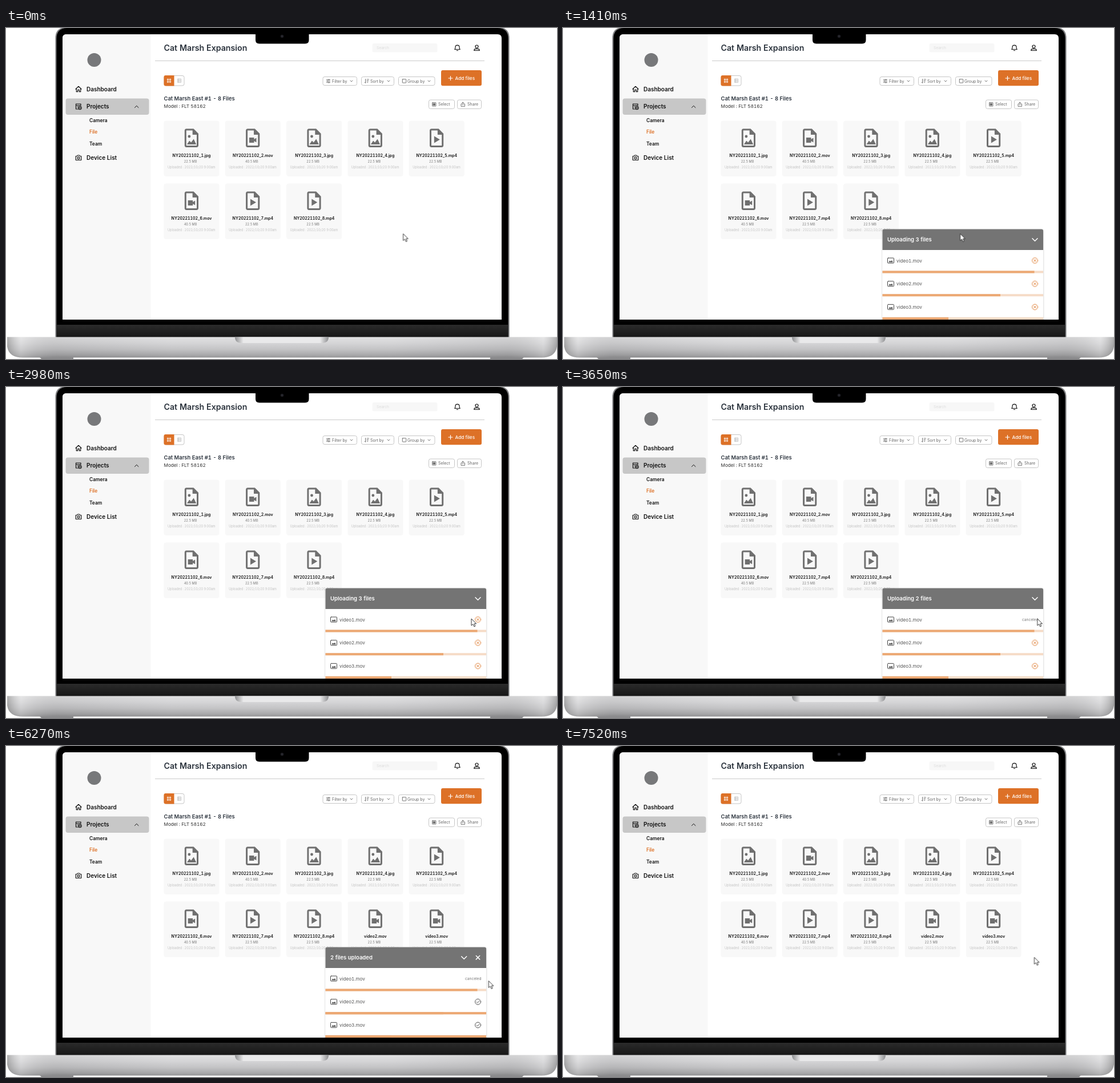
Write an HTML page that moves like this. It is 965 by 580 pixels and loops after 8 s.

```html
<!DOCTYPE html>
<html lang="en">
<head>
<meta charset="utf-8">
<title>File upload</title>
<style>
html, body { margin: 0; width: 100%; height: 100%; overflow: hidden; background: #fff; }
svg { display: block; }
text { font-family: Inter, "Open Sans", sans-serif; font-variant-numeric: tabular-nums; fill: #111; }
.mid { text-anchor: middle; }
.line { fill: none; stroke: #111; stroke-width: 1.2; stroke-linecap: round; stroke-linejoin: round; }
.nav { font-size: 10px; font-weight: 600; }
.sub { font-size: 8.4px; font-weight: 600; }
.btn { font-size: 7px; fill: #666; }
.box { fill: #fff; stroke: #c6c6c6; }
.grey { stroke: #666; stroke-width: .9; }
.name { font-size: 7px; font-weight: 600; }
.size { font-size: 5.6px; fill: #777; }
.date { font-size: 5.5px; fill: #c2c2c2; }
.head { font-size: 9.5px; font-weight: 600; fill: #fff; }
.white { stroke: #fff; stroke-width: 1.5; }
.orange { stroke: #e0853f; stroke-width: 1; }
.row { font-size: 8.1px; fill: #555; }
.dark { stroke: #444; stroke-width: 1; }

.panel, .early, .uploading, .partial, .canceled, .done, .arrow, .hand, .cursor {
  animation: 8s step-end infinite;
}
.panel { animation-name: panel; }
.early { animation-name: early; }
.uploading { animation-name: uploading; }
.partial { animation-name: partial; }
.canceled { animation-name: canceled; }
.done { animation-name: done; }
.arrow { animation-name: arrow; }
.hand { animation-name: hand; }
.cursor { animation-name: move; }
@keyframes panel { 0% { opacity: 0 } 17.625% { opacity: 1 } 93.25% { opacity: .45 } 94%, 100% { opacity: 0 } }
@keyframes early { 0% { opacity: 1 } 45.625%, 100% { opacity: 0 } }
@keyframes uploading { 0% { opacity: 1 } 63.875%, 100% { opacity: 0 } }
@keyframes partial { 0% { opacity: 0 } 45.625% { opacity: 1 } 63.875%, 100% { opacity: 0 } }
@keyframes canceled { 0% { opacity: 0 } 45.625%, 100% { opacity: 1 } }
@keyframes done { 0% { opacity: 0 } 63.875%, 100% { opacity: 1 } }
@keyframes arrow {
  0% { opacity: 1 } 39.875% { opacity: 0 } 45.625% { opacity: 1 }
  88.25% { opacity: 0 } 93.25%, 100% { opacity: 1 }
}
@keyframes hand {
  0% { opacity: 0 } 39.875% { opacity: 1 } 45.625% { opacity: 0 }
  88.25% { opacity: 1 } 93.25%, 100% { opacity: 0 }
}
@keyframes move {
  0% { transform: translate(695.6px, 360.5px) }
  27.375% { transform: translate(695.6px, 360.5px); animation-timing-function: steps(4, start) }
  31.125% { transform: translate(769.3px, 396.5px); animation-timing-function: steps(7, start) }
  38% { transform: translate(815px, 406px); animation-timing-function: steps(3, start) }
  40.8% { transform: translate(830.8px, 406px) }
  56.125% { transform: translate(830.8px, 406px); animation-timing-function: steps(4, start) }
  60% { transform: translate(846px, 412.5px) }
  78.375% { transform: translate(846px, 412.5px); animation-timing-function: steps(1, start) }
  79.3% { transform: translate(845.2px, 411.5px); animation-timing-function: steps(10, start) }
  89.2%, 100% { transform: translate(825.4px, 370.3px) }
}
</style>
</head>
<body>
<svg width="965" height="580" viewBox="0 0 965 580">
  <defs>
    <linearGradient id="metal" x2="0" y2="1">
      <stop offset="0" stop-color="#dededf"/><stop offset=".3" stop-color="#d0d0d2"/>
      <stop offset=".6" stop-color="#bdbdbf"/><stop offset=".85" stop-color="#a2a2a4"/>
      <stop offset="1" stop-color="#8a8a8c"/>
    </linearGradient>
    <linearGradient id="edges">
      <stop offset="0" stop-color="#666" stop-opacity=".4"/><stop offset=".025" stop-color="#fff" stop-opacity=".25"/>
      <stop offset=".09" stop-color="#777" stop-opacity=".1"/><stop offset=".3" stop-color="#fff" stop-opacity=".1"/>
      <stop offset=".7" stop-color="#fff" stop-opacity=".1"/><stop offset=".91" stop-color="#777" stop-opacity=".1"/>
      <stop offset=".975" stop-color="#fff" stop-opacity=".25"/><stop offset="1" stop-color="#666" stop-opacity=".4"/>
    </linearGradient>
    <linearGradient id="groove">
      <stop offset="0" stop-color="#8e8f91"/><stop offset=".09" stop-color="#e9e9ea"/>
      <stop offset=".91" stop-color="#e9e9ea"/><stop offset="1" stop-color="#8e8f91"/>
    </linearGradient>
    <linearGradient id="hinge" x2="0" y2="1">
      <stop offset="0" stop-color="#2b2b2b"/><stop offset="1" stop-color="#161616"/>
    </linearGradient>
    <path id="base" d="M2 541.5H965V558Q962 577.5 938 577.5H29Q5 577.5 2 558Z"/>
    <clipPath id="screen"><path d="M99 511V18Q99 11 106 11H861Q868 11 868 18V511Z"/></clipPath>
    <filter id="shadow" x="-5%" y="-10%" width="110%" height="120%">
      <feDropShadow dx="0" dy="1" stdDeviation="1.5" flood-opacity=".25"/>
    </filter>
    <symbol id="chevron" overflow="visible"><path d="M-2 -1 0 1 2 -1" class="line grey"/></symbol>
    <symbol id="sheet" overflow="visible">
      <path d="M3.2 1.6H15.2L22.8 9.2V29Q22.8 30.9 21 30.9H3.2Q1.6 30.9 1.6 29V3.4Q1.6 1.6 3.2 1.6Z" fill="none" stroke="#707070" stroke-width="3"/>
      <path d="M14 1V10.5H23.5Z" fill="#707070"/>
    </symbol>
    <symbol id="jpg" overflow="visible"><use href="#sheet"/>
      <circle cx="8.2" cy="13.5" r="2.4" fill="#707070"/><path d="M4.2 27.5 8.5 21 11.5 24 16 18 20.5 27.5Z" fill="#707070"/></symbol>
    <symbol id="mov" overflow="visible"><use href="#sheet"/>
      <path d="M6 15.5H14.5V18.5L18.5 16V24L14.5 21.5V24.5H6Z" fill="#707070"/></symbol>
    <symbol id="mp4" overflow="visible"><use href="#sheet"/>
      <path d="M8 13V25L18 19Z" fill="#707070"/></symbol>
    <symbol id="thumb" overflow="visible">
      <rect x=".5" y=".5" width="11" height="9" rx="1" class="line dark"/>
      <path d="M2 8 4.5 5 6 6.5 8 4.5 10 8Z" fill="#555"/></symbol>
    <symbol id="cancel" overflow="visible">
      <circle r="4.9" class="line orange"/><path d="M-2 -2 2 2M2 -2-2 2" class="line orange"/></symbol>
    <symbol id="check" overflow="visible">
      <circle r="4.9" class="line dark"/><path d="M-2.3 .2-.6 1.9 2.4 -1.5" class="line dark"/></symbol>
  </defs>

  <!-- laptop -->
  <path d="M86.4 543V18Q86.4 -1 105 -1H863Q881.6 -1 881.6 18V543Z" fill="#808183"/>
  <path d="M88.4 543V19Q88.4 0 107 0H861Q879.6 0 879.6 19V543Z"/>
  <rect x="89" y="520" width="790" height="22" fill="url(#hinge)"/>
  <path d="M58 576H118V580H62ZM848 576H908L904 580H848Z" fill="#8c8c8e"/>
  <use href="#base" fill="url(#metal)"/>
  <use href="#base" fill="url(#edges)"/>
  <path d="M401 541.5H565Q565 552 553 552H413Q401 552 401 541.5Z" fill="url(#groove)"/>

  <g clip-path="url(#screen)">
    <rect x="99" y="11" width="769" height="500" fill="#fff"/>
    <rect x="99" y="11" width="154.5" height="500" fill="#f8f8f8"/>

    <!-- sidebar -->
    <circle cx="154.5" cy="56" r="12" fill="#77787a"/>
    <rect x="104.5" y="123.5" width="146" height="28.5" rx="4" fill="#c7c7c7"/>
    <g class="line">
      <path d="M122 107 127 102.3 132 107M123.3 106V111.7H125.7V108.3H128.3V111.7H130.7V106"/>
      <path d="M131 136V133H122.5V142H126.5M122.5 135.5H131M124.8 138H126.5"/>
      <circle cx="129.5" cy="140" r="2.6"/><circle cx="129.5" cy="140" r=".5"/>
      <path d="M122.3 224.5H124.5L125.5 223H128.5L129.5 224.5H131.7V231.5H122.3Z"/>
      <circle cx="127" cy="227.8" r="1.9"/>
      <path d="M225.5 139.5 228.7 136.3 232 139.5" stroke-width="1"/>
    </g>
    <g class="nav">
      <text x="141" y="110.5">Dashboard</text>
      <text x="141" y="141">Projects</text>
      <text x="141" y="230.5">Device List</text>
    </g>
    <text class="sub" x="146" y="164.7">Camera</text>
    <text class="sub" x="146" y="185.2" style="fill:#dd7127">File</text>
    <text class="sub" x="146" y="205.7">Team</text>

    <!-- top bar -->
    <text x="276.5" y="39.5" font-size="14.2" font-weight="600" style="fill:#2b333d">Cat Marsh Expansion</text>
    <rect x="641.5" y="27" width="114" height="15.5" rx="3" fill="#f7f7f7"/>
    <text x="649" y="37.3" font-size="6.6" style="fill:#dcdcdc">Search</text>
    <path class="line" d="M785.8 37.5Q787 36.5 787 33.5Q787 30.2 790.5 30.2Q794 30.2 794 33.5Q794 36.5 795.2 37.5ZM789.3 39.5H791.7"/>
    <circle class="line" cx="824.5" cy="32.5" r="2.5"/>
    <path class="line" d="M819.8 39.5Q819.8 36.7 822.5 36.7H826.5Q829.2 36.7 829.2 39.5Z"/>
    <rect x="261" y="57" width="577" height="1" fill="#cbcbcb"/>

    <!-- toolbar -->
    <rect x="277" y="83.5" width="35" height="17.5" rx="3" class="box"/>
    <path d="M294.5 83V101.5H279.5Q276.5 101.5 276.5 98.5V86Q276.5 83 279.5 83Z" fill="#dd7127"/>
    <path d="M282.5 89.3H284.6V91.4H282.5ZM286.4 89.3H288.5V91.4H286.4ZM282.5 93.2H284.6V95.3H282.5ZM286.4 93.2H288.5V95.3H286.4Z" fill="none" stroke="#fff" stroke-width=".9"/>
    <path d="M300.5 89H306.5V95.5H300.5ZM300.5 91.2H306.5M300.5 93.3H306.5M302.5 89V95.5" fill="none" stroke="#bbb" stroke-width=".8"/>
    <rect x="555" y="85.5" width="59.5" height="15" rx="3" class="box"/>
    <rect x="622.5" y="85.5" width="57" height="15" rx="3" class="box"/>
    <rect x="687.5" y="85.5" width="63.5" height="15" rx="3" class="box"/>
    <rect x="740.5" y="126" width="45" height="15.5" rx="3" class="box"/>
    <rect x="790.5" y="126" width="42" height="15.5" rx="3" class="box"/>
    <g class="line grey">
      <path d="M561.5 90.5H567.5M561.5 93H567.5M561.5 95.5H567.5M565.5 89.7V91.3M563 92.2V93.8M565.5 94.7V96.3"/>
      <path d="M629.5 89.5V96.5L628.3 95.3M632 90H635.5M632 92.5H634.7M632 95H634"/>
      <rect x="694.3" y="89.7" width="6.4" height="6.4" rx=".5"/>
      <rect x="746.6" y="130.6" width="6.4" height="6.4" rx=".5"/>
      <path d="M748.3 132.3H751.3V135.3H748.3Z" fill="#666"/>
      <path d="M798.5 133H797V137.3H803.5V133H802M800.2 135V130L798.7 131.5M800.2 130 801.7 131.5"/>
    </g>
    <use href="#chevron" x="605" y="93"/><use href="#chevron" x="670" y="93"/><use href="#chevron" x="741" y="93"/>
    <text class="btn" x="571" y="95.5">Filter by</text>
    <text class="btn" x="638" y="95.5">Sort by</text>
    <text class="btn" x="703" y="95.5">Group by</text>
    <text class="btn" x="757" y="136.3">Select</text>
    <text class="btn" x="808" y="136.3">Share</text>
    <rect x="762" y="74" width="71" height="27.3" rx="3" fill="#dd7127"/>
    <path d="M775 88H782M778.5 84.5V91.5" class="line white" style="stroke-width:1.2"/>
    <text x="786.5" y="91" font-size="8.2" font-weight="500" style="fill:#fff">Add files</text>

    <text x="276.5" y="126.5" font-size="9.4" font-weight="600" style="fill:#2b333d">Cat Marsh East #1 - 8 Files</text>
    <text x="276.5" y="140" font-size="8.2" style="fill:#333">Model : FLT 58162</text>

    <g id="cards"></g>

    <!-- upload panel -->
    <g class="panel">
      <rect x="559.5" y="352.5" width="281.5" height="170" rx="3" fill="#fff" filter="url(#shadow)"/>
      <path d="M559.5 389V355.5Q559.5 352.5 562.5 352.5H838Q841 352.5 841 355.5V389Z" fill="#747474"/>
      <text class="head early" x="568" y="373.8">Uploading 3 files</text>
      <text class="head partial" x="568" y="373.8">Uploading 2 files</text>
      <text class="head done" x="568" y="373.8">2 files uploaded</text>
      <path class="line white uploading" d="M822 368.7 826.5 373.2 831 368.7"/>
      <path class="line white done" d="M797.7 368.7 802.2 373.2 806.7 368.7M823.3 367.5 829.7 373.9M829.7 367.5 823.3 373.9"/>
      <g id="rows"></g>
    </g>

    <g class="cursor">
      <path class="arrow" d="M0 0V12L2.9 9.5 4.9 13.9 6.9 13 5 8.8H8.7Z" fill="#fff" stroke="#222" stroke-width=".9" stroke-linejoin="round"/>
      <path class="hand" d="M-1.2 8.5V1.2Q-1 -.2 .3 -.2Q1.5 -.2 1.6 1.2V5Q3 4.2 3.8 5.5Q5.2 4.8 5.9 6.1Q7.6 5.7 7.7 7.5V10.5Q7.7 12.5 6.5 14V15.8H-.3V14.5Q-2.2 12.5-4.2 9.3Q-4.5 7.7-3 7.7Q-2.1 7.7-1.2 9M1.6 5V8M3.8 5.5V8.3M5.9 6.1V8.6" fill="#fff" stroke="#222" stroke-width=".9" stroke-linejoin="round"/>
    </g>
  </g>

  <!-- camera notch -->
  <path d="M437 0H530.5V21Q530.5 27.5 524 27.5H443.5Q437 27.5 437 21Z"/>
  <circle cx="483.5" cy="14.5" r="2.8" fill="#1d1d22"/><circle cx="483.5" cy="14.5" r="1.1" fill="#34343c"/>
</svg>
<script>
const types = ["jpg", "mov", "jpg", "jpg", "mp4", "mov", "mp4", "mp4", "mov", "mov"];

function card(type, i) {
  const added = i > 7;
  const name = added ? `video${i - 6}.mov` : `NY20221102_${i + 1}.${type}`;
  const size = type === "mov" && !added ? "40.5 MB" : "22.5 MB";
  const x = 276.5 + (i % 5) * 107.3, y = 162.5 + Math.floor(i / 5) * 110;
  return `<g transform="translate(${x} ${y})" class="${added ? "done" : ""}">
    <rect width="97" height="97.5" rx="4" fill="#f8f8f8"/>
    <use href="#${type}" x="36.2" y="14"/>
    <text class="name mid" x="48.5" y="63.5">${name}</text>
    <text class="size mid" x="46.5" y="73">${size}</text>
    <text class="date mid" x="48.3" y="83">Uploaded : 2022/10/20 9:00am</text>
  </g>`;
}

function row(progress, i) {
  const bar = (width, color, state = "") =>
    `<rect class="${state}" x="559.5" y="18" width="${width}" height="4" fill="${color}"/>`;
  const status = i
    ? `<use href="#cancel" x="826.5" class="uploading"/><use href="#check" x="826.5" class="done"/>`
    : `<use href="#cancel" x="826.5" class="early"/>
       <text class="canceled" x="832.5" y="2.5" text-anchor="end" font-size="6.6" style="fill:#777">canceled</text>`;
  return `<g transform="translate(0 ${407.5 + i * 40.7})">
    <use href="#thumb" x="568" y="-5"/>
    <text class="row" x="584" y="3">video${i + 1}.mov</text>
    ${bar(281.5, "#f6dcc7")}${bar(progress, "#eca873")}
    ${i ? bar(281.5, "#eca873", "done") : ""}${status}
  </g>`;
}

document.getElementById("cards").innerHTML = types.map(card).join("");
document.getElementById("rows").innerHTML = [266, 206.5, 115.5].map(row).join("");
</script>
</body>
</html>
```
